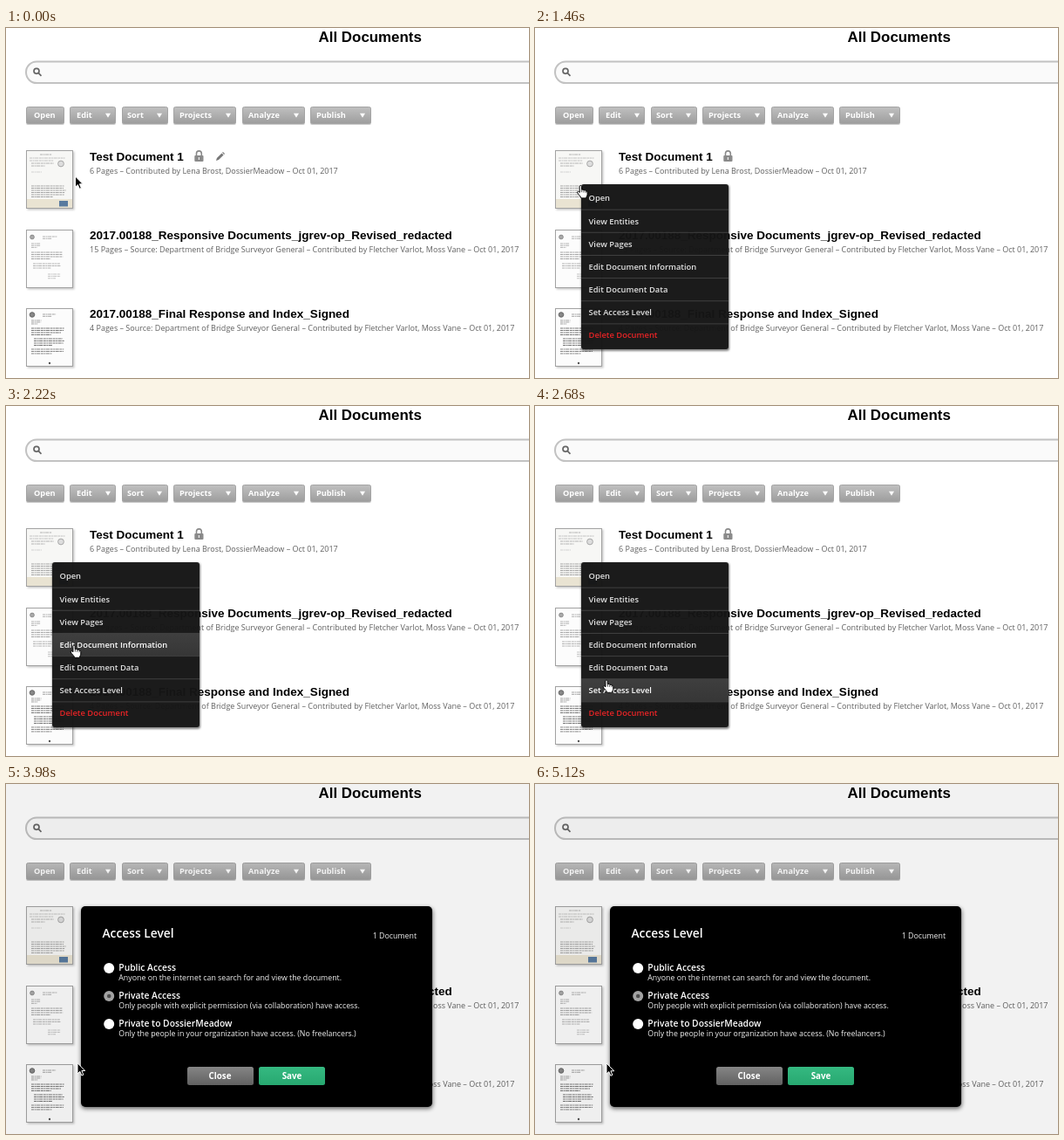
Write an HTML page that moves like this. It is 600x401 px and loops after 5140 ms.

```html
<!DOCTYPE html>
<html lang="en">
<head>
<meta charset="utf-8">
<title>All Documents</title>
<style>
  html, body { margin: 0; width: 100%; height: 100%; overflow: hidden; background: #fff; }
  svg { display: block; width: 600px; height: 401px; }
  text { font-family: "Open Sans", "Noto Sans", sans-serif; white-space: pre; }
  .head { font: bold 13.5px "Liberation Sans", Arial, sans-serif; fill: #000; }
  .title { font-size: 16.9px; }
  .meta { font-size: 9px; fill: #606060; }
  .btn { font-size: 9.2px; font-weight: 700; fill: #fff; }
  .item { font-size: 9.4px; font-weight: 600; fill: #e2e2e2; }
  .item.hot { fill: #fff; }
  .item.danger { fill: #ea2426; }
  .big { font-size: 13.8px; font-weight: 600; fill: #fff; }
  .label { font-size: 10.3px; font-weight: 600; fill: #fff; }
  .desc { font-size: 8.8px; fill: #f2f2f2; }
</style>
</head>
<body>
<svg id="stage" viewBox="0 0 600 401" xmlns="http://www.w3.org/2000/svg"></svg>
<script>
const LOOP = 5140;
const MENU_AT = 680, CLICK_AT = 3460, DIALOG_AT = 3500;
const ROW = 26.15, FIRST_ROW = 182;

const text = (cls, x, y, s, extra = '') => `<text class="${cls}" x="${x}" y="${y}" ${extra}>${s}</text>`;
const rect = (x, y, w, h, fill, extra = '') =>
  `<rect x="${x}" y="${y}" width="${w}" height="${h}" fill="${fill}" ${extra}/>`;
const gradient = (id, top, bottom) =>
  `<linearGradient id="${id}" x2="0" y2="1"><stop stop-color="${top}"/><stop offset="1" stop-color="${bottom}"/></linearGradient>`;

let seed = 7;
const random = () => (seed = (seed * 16807) % 2147483647) / 2147483647;

// Rows of tiny illegible print
function print(x, y, width, rows, step, color) {
  let out = '';
  for (let i = 0; i < rows; i++) {
    const w = i === rows - 1 ? width * .6 : width * (.88 + .12 * random());
    out += `<path d="M${x} ${y + i * step}h${w.toFixed(1)}" stroke="${color}" stroke-width=".9" stroke-dasharray="3 .6 2 .5 4 .7"/>`;
  }
  return out;
}

const page = (y, content) => `<g transform="translate(23 ${y})">
  ${rect(1.5, 1.5, 54, 67, '#000', 'opacity=".22" filter="url(#soft)"')}
  ${rect(.5, .5, 53, 66, '#fcfcfc', 'stroke="#a2a2a2"')}${content}</g>`;

const pages = [
  page(140, rect(1, 1, 52, 65, '#f7f7f5') + rect(1, 56, 52, 10, '#e9e3d2')
    + print(16, 5, 22, 1, 2, '#aaa') + print(4, 9, 46, 2, 3, '#bbb')
    + print(6, 15, 26, 2, 3, '#aaa')
    + '<circle cx="40" cy="15.5" r="3.4" fill="#ddd" stroke="#999" stroke-width=".8"/>'
    + print(6, 25, 20, 1, 3, '#ccc')
    + print(6, 41, 41, 6, 2.5, '#999')
    + rect(38, 58, 10, 6.5, '#587a9f')),
  page(231, '<circle cx="7" cy="8.5" r="2.4" fill="#aaa" stroke="#777" stroke-width=".7"/>'
    + print(19, 8, 17, 2, 2.3, '#aaa') + print(6, 16, 11, 3, 2.2, '#aaa')
    + print(6, 26, 37, 4, 2.5, '#999') + print(8, 39, 34, 3, 2.5, '#aaa')
    + print(25, 51, 15, 3, 2.4, '#bbb')),
  page(321, '<circle cx="7" cy="7.5" r="2.8" fill="#888" stroke="#555" stroke-width=".8"/>'
    + print(19, 7, 17, 2, 2.3, '#999') + print(6, 14, 12, 3, 2, '#999')
    + print(6, 23, 38, 4, 2.5, '#666') + print(9, 35, 35, 4, 2.5, '#666')
    + print(6, 47, 39, 3, 2.5, '#777')
    + '<circle cx="27" cy="63" r="1.2" fill="#555"/>')
];

const toolbar = [
  [23, 44, 'Open', 32], [73, 53, 'Edit', 81, 117], [133, 53, 'Sort', 139, 176],
  [192, 72, 'Projects', 199, 255], [271, 72, 'Analyze', 278, 333], [349, 70, 'Publish', 356, 409]
].map(([x, w, name, tx, arrow]) =>
  rect(x, 91, w, 20, '#000', 'rx="2" opacity=".2"')
  + rect(x + .5, 90.5, w - 1, 19, 'url(#gray)', 'rx="2" stroke="#a4a4a4"')
  + text('btn', tx, 103, name)
  + (arrow ? `<path d="M${arrow - 3} 97.8h6l-3 5z" fill="#fff"/>` : '')).join('');

const records = [
  [152, 'Test Document 1', '6 Pages – Contributed by Lena Brost, DossierMeadow – Oct 01, 2017'],
  [242, '2017.00188_Responsive Documents_jgrev-op_Revised_redacted',
    '15 Pages – Source: Department of Bridge Surveyor General – Contributed by Fletcher Varlot, Moss Vane – Oct 01, 2017'],
  [332, '2017.00188_Final Response and Index_Signed',
    '4 Pages – Source: Department of Bridge Surveyor General – Contributed by Fletcher Varlot, Moss Vane – Oct 01, 2017']
].map(([y, name, meta]) => text('head', 96, y, name) + text('meta', 96, y + 15, meta)).join('');

const lock = `<path d="M218.5 146v-2.2a2.9 2.9 0 0 1 5.8 0V146" fill="none" stroke="#8a8a8a" stroke-width="1.6"/>
  ${rect(216.3, 146, 10.2, 7, '#8a8a8a', 'rx="1"')}${rect(220.8, 148, 1.2, 3, '#eee')}`;
const pencil = `<path id="pencil" d="M241 152l.9-3 5.6-5.6 2.1 2.1-5.6 5.6zM248.1 142.8l.8-.8 2.1 2.1-.8.8z" fill="#777"/>`;

const menuItems = ['Open', 'View Entities', 'View Pages', 'Edit Document Information',
  'Edit Document Data', 'Set Access Level', 'Delete Document'];
const menu = `<g id="menu">
  ${rect(53, 180, 170, 190, '#000', 'rx="3" opacity=".5" filter="url(#soft)"')}
  ${rect(53, 179, 169, 189, '#161616', 'rx="3" opacity=".94"')}
  ${rect(53, 0, 169, ROW, 'url(#lit)', 'id="hover" opacity=".94"')}
  ${menuItems.slice(1).map((_, i) => rect(53, (FIRST_ROW + ROW * (i + 1) - .5).toFixed(2), 169, 1, '#404040')).join('')}
  ${menuItems.map((s, i) => text('item' + (i === 6 ? ' danger' : ''), 61.5, (198.4 + ROW * i).toFixed(2), s)).join('')}
</g>`;

const options = [
  ['Public Access', 'Anyone on the internet can search for and view the document.'],
  ['Private Access', 'Only people with explicit permission (via collaboration) have access.'],
  ['Private to DossierMeadow', 'Only the people in your organization have access. (No freelancers.)']
].map(([name, desc], i) => {
  const y = 211 + 32 * i, chosen = i === 1;
  return `<circle cx="118.2" cy="${y}" r="6" fill="${chosen ? '#a3a3a3' : '#fff'}"/>`
    + (chosen ? `<circle cx="118.2" cy="${y}" r="2.3" fill="#4c4c4c"/>` : '')
    + text('label', 129.3, y + 2.8, name) + text('desc', 129.3, y + 14.3, desc);
}).join('');

const dialog = `<g id="dialog">
  ${rect(0, 0, 600, 401, '#000', 'opacity=".052"')}
  ${rect(86, 142, 403.5, 230, '#000', 'rx="5" opacity=".6" filter="url(#glow)"')}
  ${rect(86, 140, 403, 230, '#000', 'rx="5"')}
  ${text('big', 110.5, 176, 'Access Level')}
  ${text('desc', 471, 176.5, '1 Document', 'text-anchor="end"')}
  ${options}
  ${rect(208, 324, 76, 21, 'url(#dim)', 'rx="2.5"')}
  ${rect(290, 324, 76, 21, 'url(#green)', 'rx="2.5"')}
  ${text('btn', 245.5, 338, 'Close', 'text-anchor="middle" style="font-size:9.8px"')}
  ${text('btn', 328, 338, 'Save', 'text-anchor="middle" style="font-size:9.8px"')}
</g>`;

const cursors = `<g id="cursor">
  <path id="arrow" d="M0 0v12.2l2.8-2.6 2.1 4.7 2-.9-2-4.6h3.8z" fill="#000" stroke="#fff"/>
  <g id="hand">
    <path d="M-1.2 1.2q1.2-1.8 2.4 0v4q2-.8 2.4.6 2-.5 2.4.8 1.8-.2 1.8 1.4v2.6q0 1.6-1.2 3v1.2h-6q-.3-1.6-1.6-2.8-2-2-3-4 1-1.6 3 .2z"
      fill="#fff" stroke="#000"/>
    <path d="M1.4 5.5v2.6M3.7 6.2v2.2M6 6.9v1.8" stroke="#000" stroke-width=".7"/>
  </g>
</g>`;

document.getElementById('stage').innerHTML = `<defs>
  ${gradient('gray', '#c0c0c0', '#9d9d9d')}${gradient('lit', '#414141', '#383838')}
  ${gradient('dim', '#858585', '#616161')}${gradient('green', '#35b981', '#27a870')}
  <filter id="soft" x="-10%" y="-10%" width="120%" height="120%"><feGaussianBlur stdDeviation="1.2"/></filter>
  <filter id="glow" x="-10%" y="-10%" width="120%" height="120%"><feGaussianBlur stdDeviation="2.5"/></filter>
  </defs>
  ${rect(0, 0, 600, 401, '#fff')}
  ${text('head title', 358.6, 15.7, 'All Documents')}
  ${rect(23, 38.5, 620, 24.5, '#fafafa', 'rx="12.2" stroke="#c2c2c2" stroke-width="2"')}
  <g fill="none" stroke="#666" stroke-width="1.7"><circle cx="35" cy="49.3" r="3"/><path d="M37.3 51.6l3.2 3.2"/></g>
  ${toolbar}${pages.join('')}${records}${lock}${pencil}${menu}${dialog}${cursors}`;

const [pencilEl, menuEl, hoverEl, dialogEl, cursorEl, arrowEl, handEl] =
  ['pencil', 'menu', 'hover', 'dialog', 'cursor', 'arrow', 'hand'].map(id => document.getElementById(id));
const itemEls = [...document.querySelectorAll('.item')];
const show = (el, on) => el.setAttribute('display', on ? 'inline' : 'none');

// Pointer stops: time, x, y
const path = [
  [0, 79.5, 170], [220, 52.3, 180], [1450, 52.3, 180], [2040, 77, 268],
  [2220, 78, 273.5], [2320, 78, 274], [2680, 82, 313.5], [3040, 82, 319.5], [LOOP, 82, 320]
];

function pointer(t) {
  const i = path.findIndex(stop => stop[0] > t);
  const [t0, x0, y0] = path[i - 1], [t1, x1, y1] = path[i];
  const u = (t - t0) / (t1 - t0), k = u * u * (3 - 2 * u);
  return [x0 + (x1 - x0) * k, y0 + (y1 - y0) * k];
}

function draw(t) {
  const [x, y] = pointer(t);
  const menuOpen = t >= MENU_AT && t < DIALOG_AT;
  const isHand = x < 77 && t < MENU_AT || t >= MENU_AT && t < CLICK_AT;
  const row = menuOpen && x >= 53 && y > FIRST_ROW ? Math.floor((y - FIRST_ROW) / ROW) : -1;

  show(pencilEl, t < MENU_AT);
  show(menuEl, menuOpen);
  show(hoverEl, row >= 0);
  hoverEl.setAttribute('y', FIRST_ROW + ROW * Math.max(row, 0));
  itemEls.forEach((el, i) => el.classList.toggle('hot', i === row));
  show(dialogEl, t >= DIALOG_AT);
  cursorEl.setAttribute('transform', `translate(${x.toFixed(1)} ${y.toFixed(1)})`);
  show(arrowEl, !isHand);
  show(handEl, isHand);
}

const start = performance.now();
function tick() {
  draw((performance.now() - start) % LOOP);
  requestAnimationFrame(tick);
}
draw(0);
requestAnimationFrame(tick);
</script>
</body>
</html>
```
